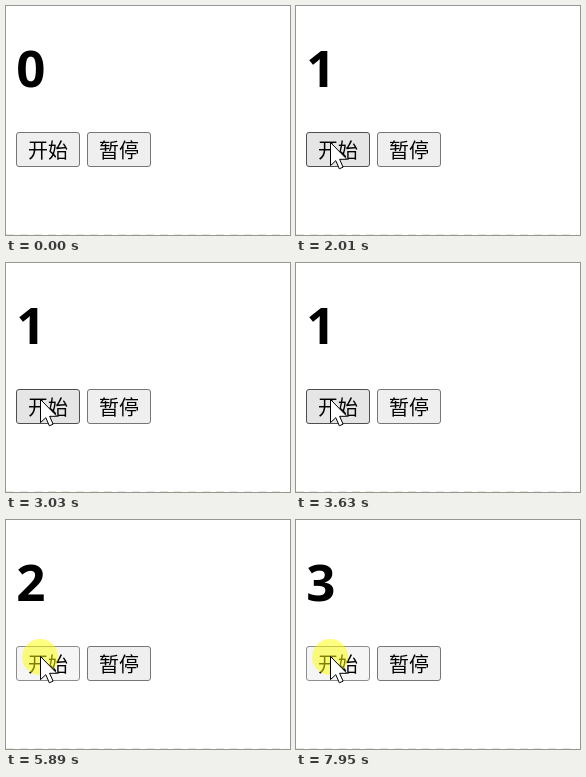
Write an HTML page with a canvas that moves like this. It is 284 px wide and 229 px high and loops after 8 s.

```html
<!DOCTYPE html>
<html lang="zh-CN">
<head>
<meta charset="utf-8">
<title>计数</title>
<style>
html, body { margin: 0; width: 100%; height: 100%; overflow: hidden; background: #fff; }
canvas { display: block; }
</style>
</head>
<body>
<canvas id="stage" width="284" height="229"></canvas>
<script>
const ctx = document.getElementById('stage').getContext('2d');
const LOOP = 8000, DELAY = 990;
const DIGITS = '700 51px "Noto Sans", "Open Sans", sans-serif';
const LABEL = '350 20px "Noto Sans CJK SC", "Noto Sans CJK", "Noto Sans CJK JP", sans-serif';
const REST = { x: 34.5, y: 136.5 };
const LOOKS = {
  normal: ['#efefef', '#767676'],
  hover: ['#e5e5e5', '#4f4f4f'],
  active: ['#f5f5f5', '#8d8d8d']
};

// Evenly spaced clicks, each held down for a moment
const burst = (at, count, gap, hold) =>
  Array.from({ length: count }, (_, i) => ({ on: at + i * gap, off: at + i * gap + hold }));

const clicks = [
  ...burst(880, 1, 0, 130),
  ...burst(2340, 7, 610 / 3, 70),
  ...burst(4890, 2, 260, 130),
  ...burst(5620, 4, 680 / 3, 130),
  ...burst(7680, 2, 270, 130)
];

// Debounce: a click counts only if no other follows within the delay
const ticks = clicks
  .filter((c, i) => i === clicks.length - 1 || clicks[i + 1].on > c.off + DELAY)
  .map(c => c.off + DELAY);

function pointerAt(t) {
  if (t < 130) return null;
  const step = Math.min(8, Math.floor((t - 130) / 68.75));
  const v = Math.pow(1 - step / 8, 1.6), u = 1 - v;
  const bend = (a, b, c) => v * v * a + 2 * u * v * b + u * u * c;
  return { x: bend(242, 90, REST.x), y: bend(216, 215, REST.y) };
}

function drawText(text, x, y, font) {
  ctx.font = font;
  ctx.fillStyle = '#000';
  ctx.fillText(text, x, y);
}

function paint(fill, edge) {
  ctx.fillStyle = fill;
  ctx.fill();
  ctx.strokeStyle = edge;
  ctx.lineWidth = 1;
  ctx.stroke();
}

function drawButton(x, label, look) {
  ctx.beginPath();
  ctx.roundRect(x + 0.5, 126.5, 63, 34, 2.5);
  paint(...LOOKS[look]);
  drawText(label, x + 12, 152, LABEL);
}

function drawPointer({ x, y }) {
  const shape = [[0, 0], [0, 16.5], [3.8, 13], [6.3, 18.8], [9, 17.6], [6.5, 12], [11.7, 12]];
  ctx.beginPath();
  shape.forEach(([px, py]) => ctx.lineTo(x + px * 1.4, y + py * 1.4));
  ctx.closePath();
  paint('#fff', '#000');
}

function drawRule() {
  ctx.beginPath();
  ctx.setLineDash([8, 6]);
  ctx.moveTo(0, 228.5);
  ctx.lineTo(281, 228.5);
  ctx.strokeStyle = '#e9e6d6';
  ctx.lineWidth = 1;
  ctx.stroke();
  ctx.setLineDash([]);
}

function draw(t) {
  const pointer = pointerAt(t);
  const down = clicks.some(c => t >= c.on && t < c.off);
  const over = pointer && pointer.x > 10 && pointer.x < 74 && pointer.y > 126 && pointer.y < 161;

  ctx.fillStyle = '#fff';
  ctx.fillRect(0, 0, 284, 229);
  drawText(ticks.filter(at => t >= at).length, 10.3, 81, DIGITS);
  drawRule();
  drawButton(10, '开始', down ? 'active' : over ? 'hover' : 'normal');
  drawButton(81, '暂停', 'normal');

  if (down) {
    ctx.beginPath();
    ctx.arc(34, 137, 18, 0, Math.PI * 2);
    ctx.fillStyle = 'rgba(255, 255, 0, 0.5)';
    ctx.fill();
  }
  if (pointer) drawPointer(pointer);
}

const start = performance.now();
function frame() {
  draw((performance.now() - start) % LOOP);
  requestAnimationFrame(frame);
}
frame();
</script>
</body>
</html>
```
